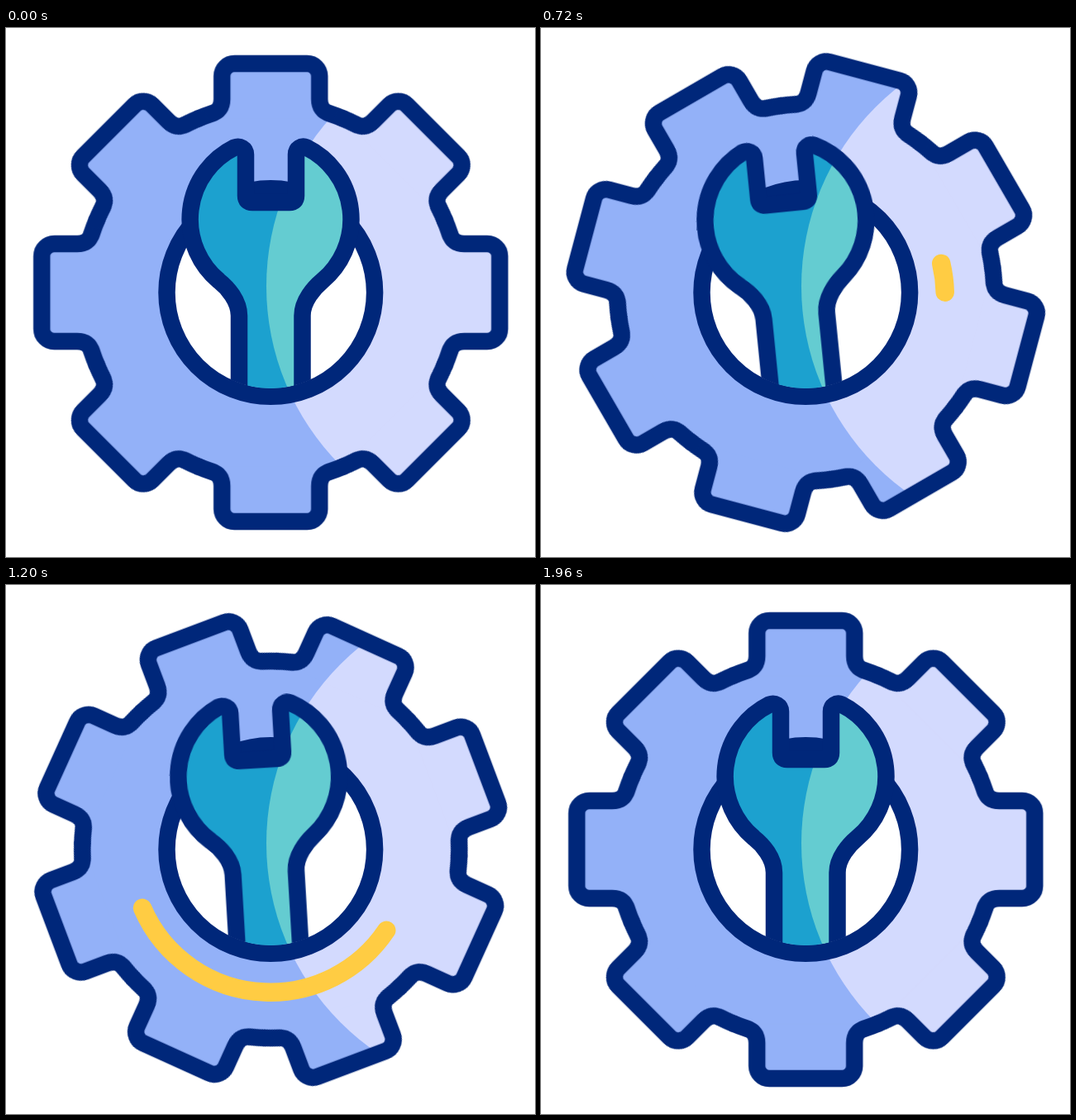
Recreate the animation shown at these times as an HTML page without scripts. Size 640 by 640 pixels, loop 2.44 s.

```html
<!DOCTYPE html>
<html lang="en">
<head>
<meta charset="utf-8">
<title>Gear and wrench</title>
<style>
  html, body { margin: 0; width: 100%; height: 100%; overflow: hidden; background: #fff; }
  svg { display: block; width: 100vw; height: 100vh; }

  .spin, .sway, .sweep {
    animation: 2440ms cubic-bezier(.3333, 0, .6667, 1) infinite;
  }
  .line { fill: none; stroke: #00277a; stroke-width: 20.5; stroke-linecap: round; stroke-linejoin: round; }
  .spin { animation-name: spin; }
  .sway { animation-name: sway; transform-origin: 320px 475px; }
  .sweep {
    fill: none; stroke: #ffcc43; stroke-width: 22.5; stroke-linecap: round;
    animation-name: length, travel, show;
  }

  /* small wind-up, then one full turn */
  @keyframes spin {
    0% { transform: rotate(0deg); }
    14.754% { transform: rotate(-12.9deg); animation-timing-function: cubic-bezier(.3333, 0, .6667, .494); }
    29.508% { transform: rotate(59.6deg); animation-timing-function: cubic-bezier(.3333, .293, .6667, .63); }
    37.705% { transform: rotate(129.2deg); animation-timing-function: cubic-bezier(.3333, .3, .6667, .704); }
    49.18% { transform: rotate(249deg); animation-timing-function: cubic-bezier(.3333, .548, .6667, 1); }
    68.852%, 100% { transform: rotate(360deg); }
  }

  @keyframes sway {
    0% { transform: rotate(0deg); }
    13.32% { transform: rotate(6deg); }
    28.074% { transform: rotate(-6.2deg); }
    40.164% { transform: rotate(6deg); }
    52.869% { transform: rotate(-5.7deg); }
    65.574% { transform: rotate(2deg); }
    80.328%, 100% { transform: rotate(0deg); }
  }

  /* visible length: head position minus tail position */
  @keyframes length {
    0%, 24.59% { stroke-dasharray: 0 400; animation-timing-function: cubic-bezier(.3333, 0, .6667, .447); }
    37.705% { stroke-dasharray: 68.8 400; animation-timing-function: cubic-bezier(.3333, 3.755, .6667, 4.573); }
    59.016% { stroke-dasharray: 85.26 400; animation-timing-function: cubic-bezier(.3333, .531, .6667, 1); }
    75.41%, 100% { stroke-dasharray: 0 400; }
  }
  @keyframes travel {
    0%, 37.705% { stroke-dashoffset: 0; }
    75.41%, 100% { stroke-dashoffset: -211.7; }
  }
  @keyframes show {
    0%, 24.6% { opacity: 0; }
    24.61%, 75.4% { opacity: 1; }
    75.41%, 100% { opacity: 0; }
  }
</style>
</head>
<body>
<svg viewBox="0 0 640 640">
  <defs>
    <path id="tooth" d="M-87.3-210.6A228 228 0 0 1-71.6-216.5Q-59-220-59-234V-262A15 15 0 0 1-44-277H44A15 15 0 0 1 59-262V-234Q59-220 71.6-216.5A228 228 0 0 1 87.3-210.6"/>
    <g id="pair">
      <use href="#tooth"/>
      <use href="#tooth" transform="rotate(45)"/>
    </g>
    <g id="teeth">
      <use href="#pair"/>
      <use href="#pair" transform="rotate(90)"/>
      <use href="#pair" transform="rotate(180)"/>
      <use href="#pair" transform="rotate(270)"/>
    </g>
    <g id="body">
      <circle r="223"/>
      <use href="#teeth"/>
    </g>
    <path id="wrench" d="M282 470V348C282 330 268 314 257.700 306A97 97 0 0 1 276.500 144.500C283 142 290 146 290 153V203Q290 211 298 211H343Q351 211 351 203V153C351 146 357.500 142 363.500 144.500A97 97 0 0 1 382.500 306C373 314 358.500 330 358.500 348V470"/>
    <clipPath id="light"><circle cx="621.500" cy="312.500" r="306.500"/></clipPath>
    <clipPath id="window"><path d="M0 0H640V320H436.300A116 116 0 0 1 204.300 320H0Z"/></clipPath>
  </defs>

  <g transform="translate(320.3 320.1)" fill="#93b1f8">
    <use class="spin" href="#body"/>
  </g>
  <g clip-path="url(#light)">
    <g transform="translate(320.3 320.1)" fill="#d3dafe">
      <use class="spin" href="#body"/>
    </g>
  </g>
  <g transform="translate(320.3 320.1)">
    <g class="line"><use class="spin" href="#teeth"/></g>
  </g>

  <path class="sweep" pathLength="211.7" d="M484.200 284.900A168.800 168.800 0 1 1 159.700 271"/>

  <circle cx="320.300" cy="320" r="125.800" fill="#fff" stroke="#00277a" stroke-width="20.500"/>

  <g clip-path="url(#window)">
    <g fill="#1ca1cf"><use class="sway" href="#wrench"/></g>
    <g clip-path="url(#light)" fill="#64ccd1"><use class="sway" href="#wrench"/></g>
    <g class="line"><use class="sway" href="#wrench"/></g>
  </g>
</svg>
</body>
</html>
```
